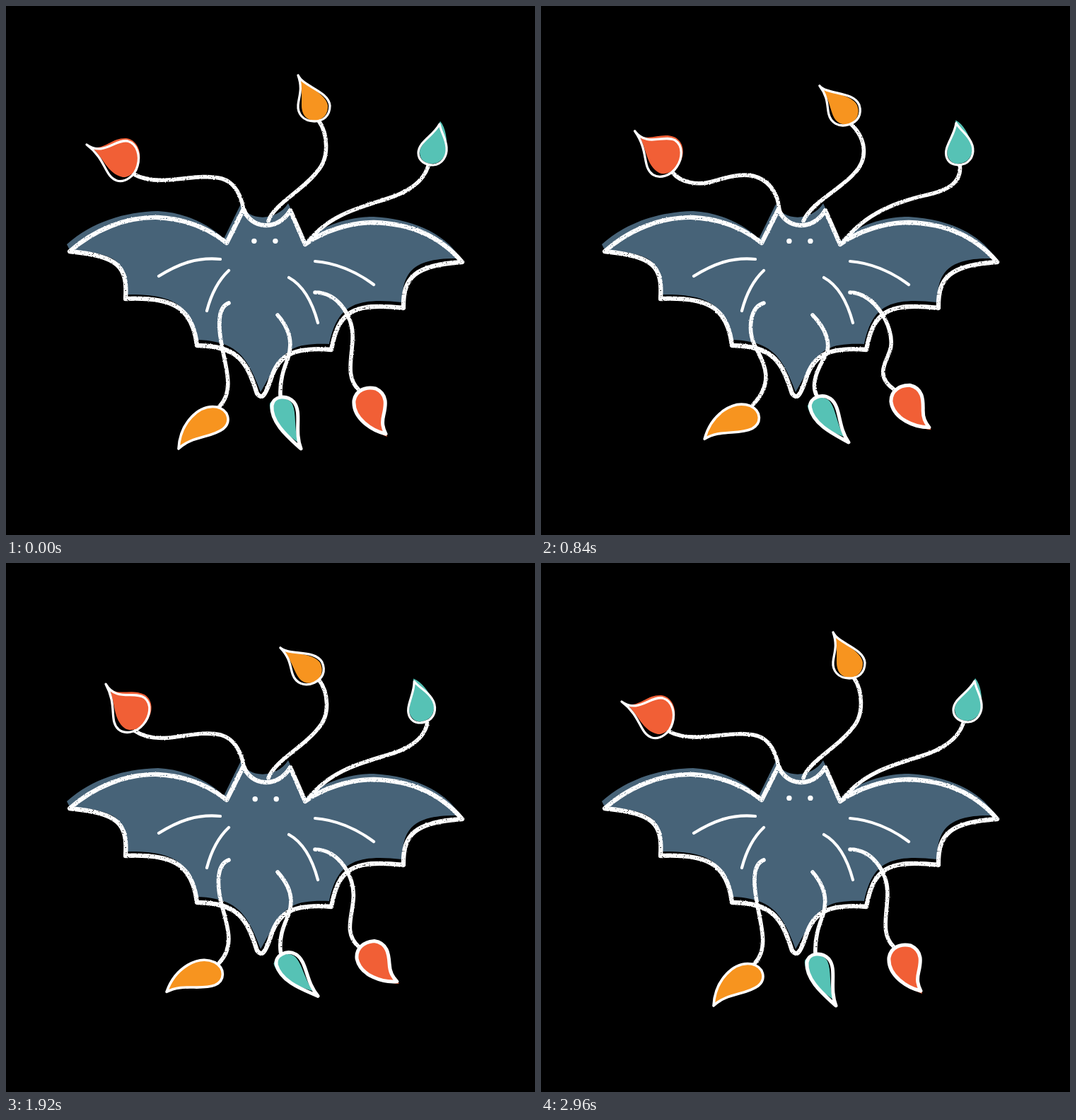
Recreate the animation shown at these times as an HTML page. Size 748 px wide and 748 px high, loop 3 s.

```html
<!DOCTYPE html>
<html>
<head>
<meta charset="utf-8">
<style>
html, body { margin: 0; height: 100%; background: #000; overflow: hidden; }
svg { display: block; width: 100%; height: 100%; }
.line { fill: none; stroke: #fff; stroke-linecap: round; stroke-linejoin: round; }
</style>
</head>
<body>
<svg viewBox="0 0 748 748">
  <filter id="chalk" filterUnits="userSpaceOnUse" x="0" y="0" width="748" height="748" color-interpolation-filters="sRGB">
    <feTurbulence type="fractalNoise" baseFrequency=".45" numOctaves="2" seed="4" result="noise"/>
    <feDisplacementMap in="SourceGraphic" in2="noise" scale="2" xChannelSelector="G" yChannelSelector="B" result="rough"/>
    <feColorMatrix in="noise" values="0 0 0 0 1  0 0 0 0 1  0 0 0 0 1  -6 0 0 0 4.9" result="grain"/>
    <feComposite in="rough" in2="grain" operator="in"/>
  </filter>

  <path fill="#476378" d="M86 337 C122 305 168 291 215 290 C252 292 285 307 308 329 L332 280 C341 304 382 306 399 279
    L424 332 C445 311 485 298 520 298 C570 301 618 318 643 357 C573 355 561 378 560 419 C490 411 468 426 457 478
    C395 476 392 490 360 546 C342 500 330 473 268 472 C262 418 228 407 170 408 C172 360 155 350 90 345 Z"/>
  <path class="line" stroke-width="6.3" filter="url(#chalk)" d="M90 347 C125 316 170 298 215 299 C252 301 285 313 312 335
    L336 287 C346 316 384 319 402 289 L423 337 C448 318 488 306 520 306 C572 308 612 324 645 362
    C578 366 561 384 562 427 C490 419 470 432 460 486 C398 481 383 499 373 532 C366 551 362 557 355 548
    C340 502 329 481 270 480 C264 424 232 411 169 414 C172 368 160 354 90 347 Z"/>
  <path class="line" stroke-width="4.2" d="M216 382 C245 364 270 355 303 358 M315 374 C300 388 290 408 284 431
    M437 361 C465 363 495 375 520 394 M400 384 C420 395 433 418 441 448"/>
  <g id="eyes" fill="#fff"><circle cx="351.4" cy="332.9" r="3.7"/><circle cx="381.4" cy="332.9" r="3.7"/></g>
  <g id="stems" class="line" stroke-width="5.6" filter="url(#chalk)"></g>
  <g id="leaves"></g>
</svg>
<script>
const RED = '#f15f36', ORANGE = '#f7941f', TEAL = '#56c2b5';

// Each stem blends between a relaxed and a bent path.
const stems = [
  ['M181 238 C195 246 215 248 240 245 C262 243 285 239 305 244 C322 249 332 266 336 288',
   'M187 236 C198 250 222 254 240 249 C258 244 278 236 300 240 C320 245 335 262 337 288'],
  ['M442 162 C455 180 458 215 440 234 C422 259 378 281 371 304',
   'M438 167 C462 190 462 218 443 237 C425 258 382 278 371 304'],
  ['M597 226 C590 250 567 264 537 273 C500 285 455 296 428 333',
   'M592 226 C595 250 575 261 545 267 C505 276 460 292 428 333'],
  ['M315 420 C298 426 300 455 306 485 C312 515 322 545 302 566',
   'M315 420 C294 426 292 460 302 480 C316 505 331 530 300 563'],
  ['M384 437 C400 455 406 475 399 497 C392 515 387 530 388 551',
   'M384 437 C402 455 412 478 402 495 C390 515 381 535 390 551'],
  ['M437 405 C470 405 492 440 490 472 C489 500 480 525 499 543',
   'M437 405 C472 405 500 455 495 483 C492 500 468 520 499 542']
];

const leaves = [
  { color: RED, pivot: '185 246', swing: 30.5, width: 3.3,
    fill: 'M121 200 C140 203 150 186 170 187 C185 189 191 205 189 217 C187 230 177 243 165 242 C143 237 138 214 121 200Z',
    edge: 'M114 196 C138 213 154 188 172 191 C186 195 190 212 186 226 C182 241 168 250 157 247 C139 241 142 217 114 196Z' },
  { color: ORANGE, pivot: '450 166', swing: -31, width: 3.3,
    fill: 'M415 104 C428 114 452 125 455 140 C456 153 448 161 438 162 C424 162 418 153 418 140 C418 125 419 115 415 104Z',
    edge: 'M413 98 C420 114 456 120 458 141 C458 156 448 163 436 163 C420 163 412 152 413 140 C414 128 420 118 413 98Z' },
  { color: TEAL, pivot: '596 236', swing: -36.5, width: 3.2,
    fill: 'M614 163 C622 172 624 190 623 202 C621 216 612 223 603 223 C592 223 585 217 585 207 C585 195 602 185 614 163Z',
    edge: 'M613 167 C604 184 583 192 583 208 C583 219 593 225 604 225 C617 224 624 212 623 200 C622 187 616 181 613 167Z' },
  { color: ORANGE, pivot: '305 556', swing: 20, width: 3.6,
    fill: 'M244 626 C246 590 272 563 298 567 C315 571 319 588 307 598 C290 611 262 608 244 626Z',
    edge: 'M244 626 C246 590 272 563 298 567 C315 571 319 588 307 598 C290 611 262 608 244 626Z' },
  { color: TEAL, pivot: '389 548', swing: -24, width: 5,
    fill: 'M413 617 C392 603 371 580 373 562 C380 552 399 552 405 563 C411 576 407 597 413 617Z',
    edge: 'M417 626 C402 612 374 590 376 565 C378 551 397 549 407 560 C419 575 407 600 417 626Z' },
  { color: RED, pivot: '500 545', swing: -21, width: 5,
    fill: 'M539 609 C518 601 490 583 491 558 C494 542 510 538 523 541 C540 549 539 565 536 578 C533 590 536 598 539 609Z',
    edge: 'M537 605 C518 601 490 583 492 558 C495 542 510 538 523 541 C540 549 537 565 534 578 C531 590 533 597 537 605Z' }
];

const get = id => document.getElementById(id);
function add(parent, tag, attrs = {}) {
  const node = document.createElementNS(parent.namespaceURI, tag);
  for (const key in attrs) node.setAttribute(key, attrs[key]);
  return parent.appendChild(node);
}

const stemNodes = stems.map(() => add(get('stems'), 'path'));
const leafNodes = leaves.map(leaf => {
  const group = add(get('leaves'), 'g');
  add(group, 'path', { d: leaf.fill, fill: leaf.color });
  add(group, 'path', { d: leaf.edge, class: 'line', 'stroke-width': leaf.width });
  return group;
});

function blend([a, b], k) {
  const ends = b.match(/\d+/g);
  let i = 0;
  return a.replace(/\d+/g, n => (+n + (ends[i++] - n) * k).toFixed(2));
}

const smooth = x => { x = Math.min(1, Math.max(0, x)); return x * x * (3 - 2 * x); };
const wave = (t, peak) => Math.cos(2 * Math.PI * (t - peak) / 3);

function draw(now) {
  const t = now / 1000 % 3;
  const swing = t < 1.52 ? smooth(t / 1.52) : 1 - smooth((t - 1.52) / 1.4);
  const bend = (wave(t, 1.06) + .6) / 1.6;
  const nod = .8 * wave(t, 1.9);
  stemNodes.forEach((node, i) => node.setAttribute('d', blend(stems[i], bend)));
  leafNodes.forEach((node, i) =>
    node.setAttribute('transform', `rotate(${leaves[i].swing * swing} ${leaves[i].pivot})`));
  get('eyes').setAttribute('transform', `translate(${nod} ${nod})`);
}

const start = performance.now();
function tick() {
  draw(performance.now() - start);
  requestAnimationFrame(tick);
}
tick();
</script>
</body>
</html>
```
